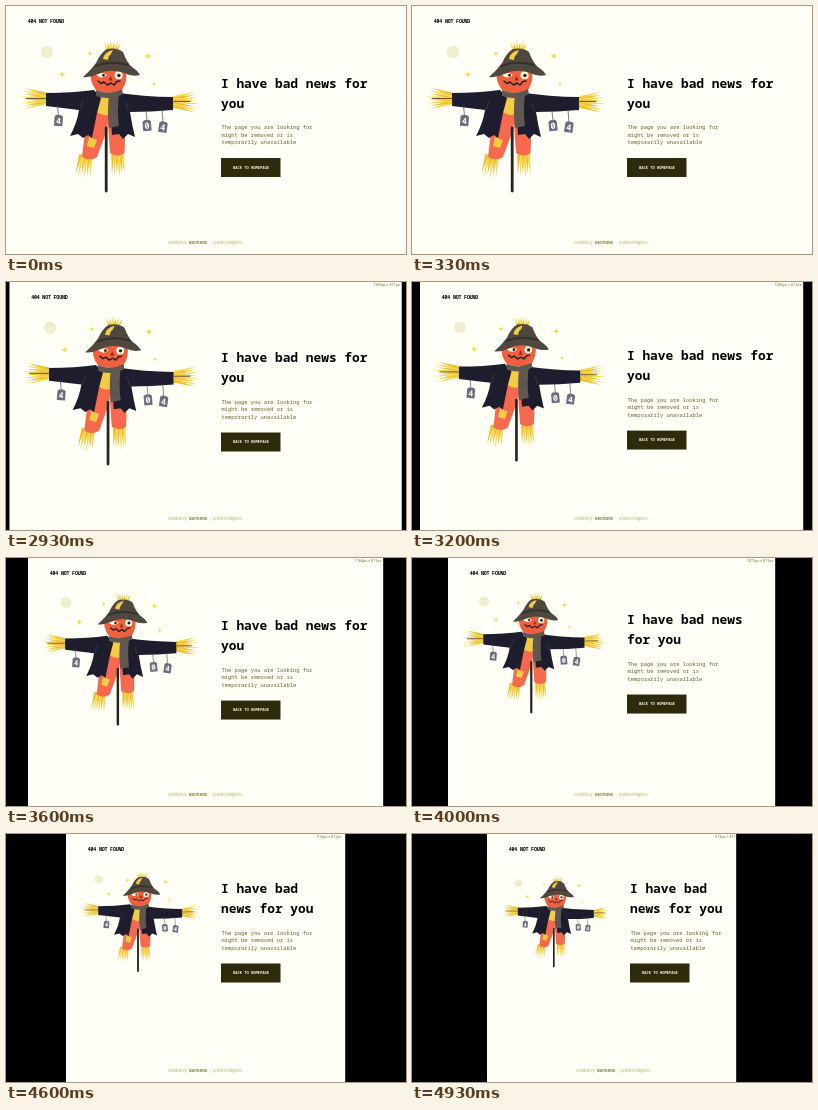
Recreate the animation shown at these times as an HTML page. Size 400 by 248 pixels, loop 4990 ms.

```html
<!DOCTYPE html>
<html lang="en">
<head>
<meta charset="utf-8">
<title>404 Not Found</title>
<style>
html, body { margin: 0; width: 100%; height: 100%; overflow: hidden; background: #000; }
svg { display: block; width: 100vw; height: 100vh; }
text { white-space: pre; font-family: "Noto Sans Mono", "DejaVu Sans Mono", monospace; }
.title { font-size: 5px; font-weight: 700; letter-spacing: -.2px; }
.head { font-size: 12.85px; font-weight: 700; }
.para { font-size: 5.43px; fill: #66632f; }
.btn { font-size: 3.75px; font-weight: 600; fill: #f4f3e4; }
.foot { font: 3.7px Inter, sans-serif; fill: #b3ac5c; }
.foot .user { font-weight: 700; fill: #7d7836; }
.size { font: 3.75px Roboto, sans-serif; fill: #77733f; }
.tag text { font-size: 8.5px; font-weight: 700; fill: #fff; text-anchor: middle; }
</style>
</head>
<body>
<svg viewBox="0 0 400 248" preserveAspectRatio="none">
  <rect width="400" height="248" fill="#fffff8"/>
  <text class="title" id="title" y="16.8">404 NOT FOUND</text>
  <g id="figure"></g>
  <g id="copy">
    <text class="head" x="215" y="81.5" id="line1"></text>
    <text class="head" x="215" y="101.5" id="line2"></text>
    <text class="para" x="215.5" y="123">The page you are looking for</text>
    <text class="para" x="215.5" y="130.5">might be removed or is</text>
    <text class="para" x="215.5" y="138">temporarily unavailable</text>
    <rect x="215" y="152" width="59.5" height="19" fill="#2e2b0c"/>
    <text class="btn" x="227" y="162.9">BACK TO HOMEPAGE</text>
  </g>
  <g class="foot" id="foot">
    <text class="foot" x="162" y="238.4">created by</text>
    <text class="foot user" x="183" y="238.4">username</text>
    <text class="foot" x="204.5" y="238.4">- practicePages.io</text>
  </g>
  <text class="size" id="size" y="4.4"></text>
  <rect id="barL" height="248"/>
  <rect id="barR" height="248"/>
</svg>
<script>
const LOOP = 4990, LABEL_AT = 2530, DRAG_AT = 2730;
const $ = id => document.getElementById(id);

const shape = (d, fill) => `<path d="${d}" fill="${fill}"/>`;
const line = (d, color, w) =>
  `<path d="${d}" fill="none" stroke="${color}" stroke-width="${w}" stroke-linecap="round" stroke-linejoin="round"/>`;
const disc = (x, y, r, fill) => `<circle cx="${x}" cy="${y}" r="${r}" fill="${fill}"/>`;
const star = (x, y, r) =>
  shape(`M${x} ${y - r}Q${x} ${y} ${x + r} ${y}Q${x} ${y} ${x} ${y + r}Q${x} ${y} ${x - r} ${y}Q${x} ${y} ${x} ${y - r}`, '#f5dc45');

// Fan of pointed straws; angle in degrees, 0 points right
function straw(x, y, angle, len, spread, count, base) {
  let out = '';
  for (let i = 0; i < count; i++) {
    const u = i / (count - 1) - .5;
    const l = len * (i % 2 ? .8 : 1 - Math.abs(u) * .3);
    out += `<path transform="translate(${x} ${y}) rotate(${angle}) translate(0 ${u * base}) rotate(${u * spread})"
      d="M0-1.9L${l} 0L0 1.9Z" fill="${i % 2 ? '#eec136' : '#f7d752'}"/>`;
  }
  return out;
}

function tag(x, y, turn, digit, top) {
  return line(`M${x - 1} ${top}L${x} ${y - 5}`, '#4a4853', .7) +
    `<g class="tag" transform="translate(${x} ${y}) rotate(${turn})">
      <path d="M-4.2-4L-2.4-5.5H2.4L4.2-4V5.5H-4.2Z" fill="#6f6d7b"/>
      <text y="3.4">${digit}</text></g>`;
}

const COAT = '#1e1d2e', HAT = '#4e483f', SKIN = '#f0603f', LEG = '#f6694f', GOLD = '#f4cb45', SCARF = '#5f5750';

$('figure').innerHTML = [
  disc(41, 46, 6.3, '#efefcf'),
  star(56, 68.5, 4.2), star(84, 47.5, 3.2), star(142, 50, 4.5), star(148, 78, 2.8),
  // legs and pole
  straw(80, 149, 99, 25, 14, 6, 10),
  straw(111.5, 146, 88, 27, 10, 6, 9),
  shape('M82 104H104L101 124L91 151Q84 156 76 151L79 126Z', LEG),
  shape('M101 104H117Q120 128 118.5 147Q112 152 104 147Z', LEG),
  shape('M83 131L91 134L88 142L81 140Z', GOLD),
  shape('M91 88H104V108Q97 111 91 106Z', GOLD),
  line('M100.2 122V185', '#25241f', 2.8),
  // arms
  straw(41, 92.5, 180, 29, 32, 8, 8),
  straw(167, 96, 0, 28, 32, 8, 8),
  line('M20 92.5H41M168 95.5H184', '#6d5a30', 1),
  shape('M40 87Q66 87 88 84L95 92L91 107L86 132L82 129L77 132L72 128L64 130Q71 117 73 104L40 100Z', COAT),
  shape('M107 86Q138 91 167 91L167 104Q145 106 124 106Q126 119 129 131L122 128L117 133L113 128L106 129L104 101Z', COAT),
  line('M74 104L77 95M122 105L120 97', '#3d3b4b', .8),
  // scarf, head
  shape('M103 88L113 87Q111 106 113 120L103 122Q101 106 103 88Z', SCARF),
  shape('M85 64Q102 57 120 64Q122 75 116 84Q103 90 90 84Q83 75 85 64Z', SKIN),
  shape('M90 84Q103 90 116 83L117 88Q103 95 90 90Z', SCARF),
  shape('M90 69Q96 65 101 69Q96 74 90 69Z', '#fff6df'),
  disc(97.5, 69.3, 1.4, '#241c20'),
  disc(112.6, 69.3, 4, '#fff6df'),
  disc(112.9, 69.5, 1.7, '#241c20'),
  shape('M104.5 70L106.5 74.5H102.5Z', '#8c2c26'),
  line('M92 75L95 77.5L98 76L101.5 79L105 77L108 79L111 75.5L114 75', '#241c20', 1.5),
  // hat
  straw(106, 47, -87, 14, 48, 6, 7),
  shape('M77 71Q85 64 90 57Q95 46 101 43Q111 41 117 46Q121 57 126 61Q132 65 134 69Q126 71 118 67Q104 62 92 68Q84 72 77 71Z', HAT),
  shape('M97 53Q98 46 107 44L105 48Q102 50 102 54Z', GOLD),
  line('M90 60Q104 54 122 59', '#34302b', 2),
  // hanging digits
  tag(52.5, 114.5, 4, '4', 100),
  tag(141, 119.5, -5, '0', 105),
  tag(157, 121, 8, '4', 104)
].join('');

// Steps alternate between 70 and 130 ms
function stepAt(t) {
  const d = t - DRAG_AT;
  return d < 0 ? -1 : Math.floor(d / 200) * 2 + (d % 200 >= 70 ? 1 : 0);
}

function insetAt(n) {
  if (n < 0) return 0;
  if (n < 6) return 8 * Math.pow((n + 1) / 6, 1.2);
  return n <= 17 ? 8 + 3.5 * (n - 5) : 50 + 5 * (n - 17);
}

const words = 'I have bad news for you'.split(' ');

function layout(inset, labelled) {
  const width = 400 - 2 * inset;
  const push = Math.max(0, (inset - 60) / 5);
  const scale = (width - 46) / 354 + push * .0075;
  const rise = 76 * (1 - scale);
  const lift = Math.min(22.5, rise);
  const right = inset + (labelled ? .8 : 0);

  $('title').setAttribute('x', 21.7 + inset);
  $('figure').setAttribute('transform',
    `translate(${194 + push * 1.33} ${34 + rise - lift}) scale(${scale}) translate(-194 -34)`);
  $('copy').setAttribute('transform', `translate(${push} ${-lift})`);
  $('foot').setAttribute('transform', `translate(${push * .67} 0)`);

  const split = inset < 25 ? 5 : inset < 57 ? 4 : 3;
  $('line1').textContent = words.slice(0, split).join(' ');
  $('line2').textContent = words.slice(split).join(' ');

  $('size').textContent = labelled ? `${Math.round(width * 3.27)}px × 811px` : '';
  $('size').setAttribute('x', 370.8 - inset + push * 2.5);
  $('barL').setAttribute('width', inset);
  $('barR').setAttribute('x', 400 - right);
  $('barR').setAttribute('width', right);
}

const start = performance.now();
function draw() {
  const t = (performance.now() - start) % LOOP;
  layout(insetAt(stepAt(t)), t >= LABEL_AT);
  requestAnimationFrame(draw);
}
draw();
</script>
</body>
</html>
```
